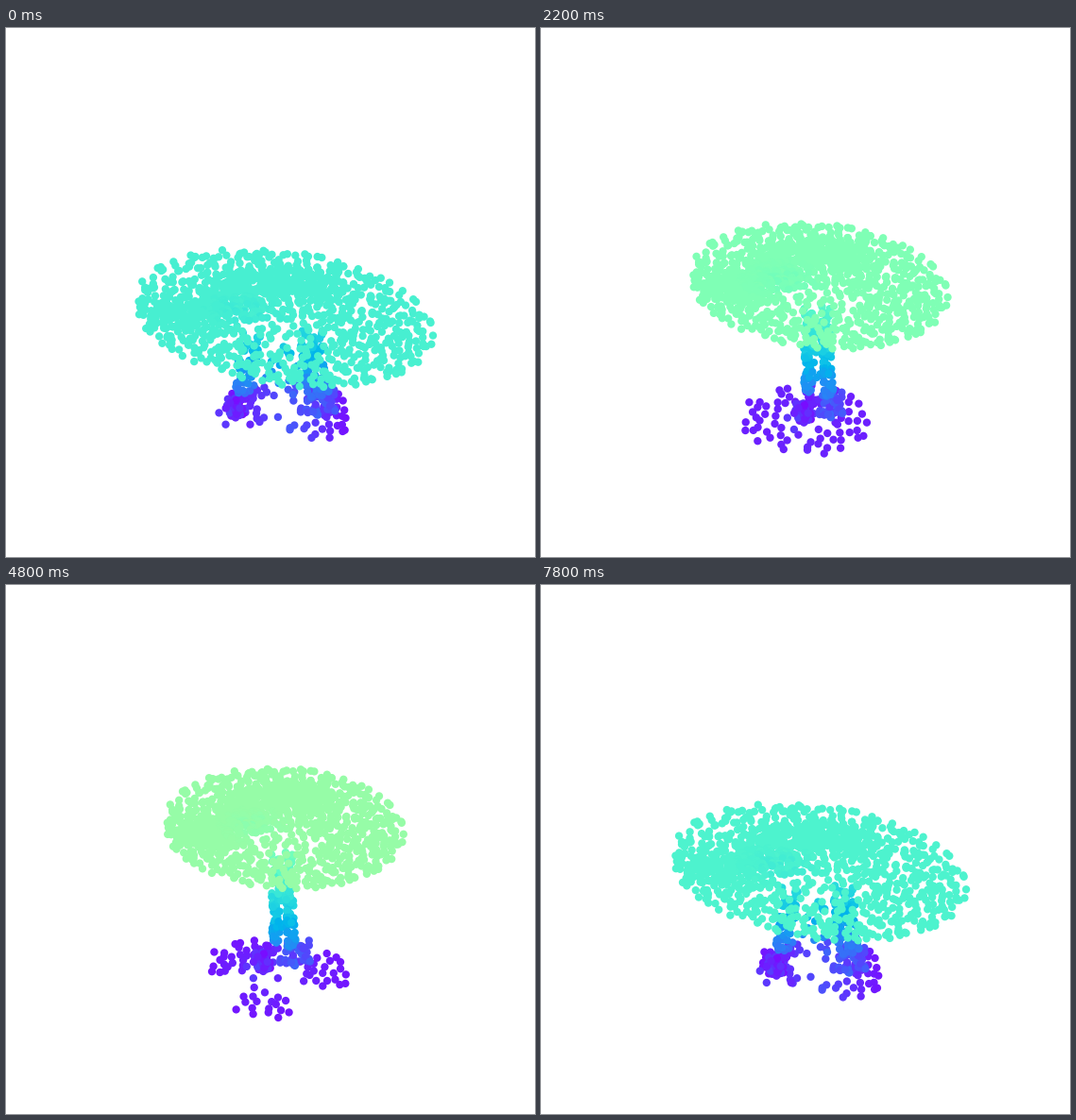
Animation, 560 px wide and 560 px high, one loop 8 s. Source, as a matplotlib script:

```python
import numpy as np
import matplotlib.pyplot as plt
from matplotlib.animation import FuncAnimation

SIZE, FRAMES = 560, 40
GOLDEN = np.pi * (3 - np.sqrt(5))
rng = np.random.default_rng(11)


def spiral(count, inner, jitter):
    """Evenly spread points of the unit disc, slightly shaken."""
    r = np.sqrt(np.linspace(inner ** 2, 1, count))
    a = GOLDEN * np.arange(count)
    xy = np.column_stack([r * np.cos(a), r * np.sin(a)])
    xy += rng.normal(0, jitter, xy.shape)
    return xy / np.maximum(1, np.hypot(*xy.T))[:, None]


def top_plan():
    """Flat top: an even disc plus a dense wavy band, back to front."""
    u = rng.uniform(-.78, .36, 400)
    v = -.12 - .45 * np.sin(np.pi * (u + .45) / 1.1)
    band = np.column_stack([u, v]) + rng.normal(0, .12, (400, 2))
    p = np.concatenate([spiral(780, 0, .028), band])
    opening = np.hypot(p[:, 0], p[:, 1] - .35) < .3
    keep = (np.hypot(*p.T) <= 1) & (~opening | (rng.random(len(p)) < .6))
    p = p[keep]
    return p[np.argsort(p[:, 1])].T


top_u, top_v = top_plan()
top_dip = (.035 * rng.random(len(top_u))
           * np.exp(-((top_u + .25) ** 2 + top_v ** 2) / .04))
floor_x, floor_y = spiral(68, .4, .05).T
left_leg, mid_leg, right_leg = (rng.uniform(-1, 1, (3, n))
                                for n in (55, 14, 85))
left_blob, right_blob = (np.clip(rng.normal(0, .55, (3, n)), -1.1, 1.1)
                         for n in (50, 42))


def points(x, y, height):
    return np.column_stack(np.broadcast_arrays(x, y, height))


def level(q):
    """Screen height and colour value of the top."""
    y = 307 - 62 * q
    return y, (432 - y) / 320


def top(q):
    y, height = level(q)
    tilt = np.radians(14 * (1 - q ** 2))
    dy = top_u * np.sin(tilt) + top_v * np.cos(tilt)
    return points(294 + (158 - 39 * q) * top_u,
                  y + (73 - 11.5 * q) * dy, height - top_dip)


def leg(q, noise, foot_x, head_x, width):
    s, side, lift = noise
    s = (s + 1) / 2
    y, height = level(q)
    foot_y = 392 + 8 * np.sin(np.pi * q) - 13 * q
    head_y = y + 18 + 15 * q
    foot_h, head_h = .13 + .06 * q ** 2, height - .07
    return points(foot_x + (head_x - foot_x) * s + width * side,
                  foot_y + (head_y - foot_y) * s + 5 * lift,
                  foot_h + (head_h - foot_h) * s)


def blob(noise, x, y, wide, tall, height):
    dx, dy, dh = noise
    return points(x + wide * dx, y + tall * dy,
                  np.maximum(height + .03 * dh, 0))


def floor(q, apart):
    """Round plate, pulled into two feet early and three feet late."""
    plate = points(279 + 70 * floor_x, 416 + 37.5 * floor_y, .042)

    pull = np.sin(np.pi / 2 * floor_x)
    two = points(299 + 61 * pull,
                 403 + 8 * pull + (25 + 9 * pull) * floor_y,
                 .025 + .09 * (1 - np.abs(pull)))

    tips = np.array([(98, 5), (-13, 62), (-55, -20)])
    aim = tips / (70, 37.5)
    aim /= np.hypot(*aim.T)[:, None]
    tip = tips[np.argmax(np.column_stack([floor_x, floor_y]) @ aim.T, axis=1)]
    r = np.hypot(floor_x, floor_y)
    three = points(283 + .65 * r * tip[:, 0] + 30 * floor_x,
                   405 + .65 * r * tip[:, 1] + 17 * floor_y, .07 - .05 * r)

    split = np.clip((q - .55) / .4, 0, 1.125)
    return plate + apart * (two - plate) + split * (three - plate)


def cloud(n):
    q = min(n, FRAMES - n) / (FRAMES / 2)
    apart, late, swell = (1 - q) ** 3, q ** 3, np.sin(np.pi * q)
    left, right = 286 - 35 * apart, 302 + 28 * apart
    return np.concatenate([
        floor(q, apart),
        blob(left_blob, 286 - 44 * apart - 28 * late,
             401 + 8 * swell - 16 * late, 15, 17, .05),
        blob(right_blob, 306 + 28 * apart + 6 * late,
             397 + 6 * swell - 20 * late, 10 + 10 * apart + 14 * late, 15, .1),
        leg(q, left_leg, left, 285 - 25 * apart, 4 + 6 * apart),
        leg(q, mid_leg, (left + right) / 2, 292 + 8 * apart, 5 + 13 * apart),
        leg(q, right_leg, right, 299 + 25 * apart, 4.5 + 8 * apart),
        top(q),
    ])


fig = plt.figure(figsize=(5.6, 5.6), dpi=100, facecolor="white")
ax = fig.add_axes([0, 0, 1, 1])
ax.set(xlim=(0, SIZE), ylim=(SIZE, 0))
ax.axis("off")
x, y, height = cloud(0).T
dots = ax.scatter(x, y, c=height, s=20, cmap="rainbow", vmin=0, vmax=1,
                  linewidths=1.5, edgecolors="face")


def update(n):
    now = cloud(n)
    dots.set_offsets(now[:, :2])
    dots.set_array(now[:, 2])
    return dots,


anim = FuncAnimation(fig, update, frames=FRAMES, interval=200,
                     repeat=True, repeat_delay=0, blit=False)
plt.show()
```
